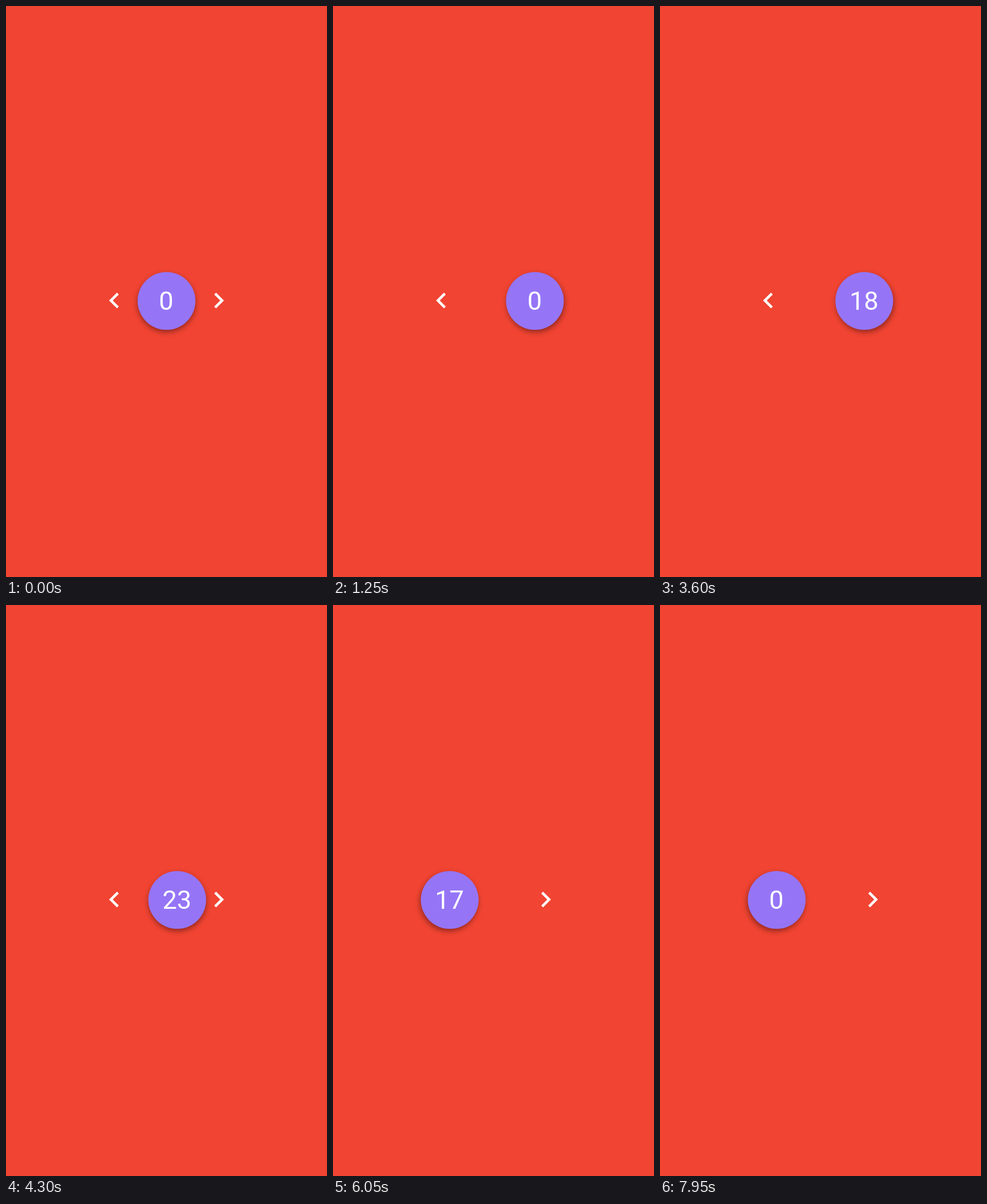
An HTML page with a canvas that plays this animation: 561x998 px, repeating every 8000 ms.

```html
<!DOCTYPE html>
<html lang="en">
<head>
<meta charset="utf-8">
<title>Stepper</title>
<style>
  html, body { margin: 0; width: 100%; height: 100%; overflow: hidden; background: #f14432; }
  canvas { display: block; }
</style>
</head>
<body>
<canvas id="stage" width="561" height="998"></canvas>
<script>
const ctx = document.getElementById('stage').getContext('2d');
const LOOP = 8000;
const MID = 280.5, Y = 515.5, RADIUS = 50.5;
const REACH = 76.5;
const TICK = 110, TOP = 23;
const RELEASE = 4090, DECAY = 150;

const clamp = (v, lo, hi) => Math.min(hi, Math.max(lo, v));

function smooth(t, from, to) {
  const u = clamp((t - from) / (to - from), 0, 1);
  return u * u * (3 - 2 * u);
}

// Drag right, let go, then drag left.
function knobX(t) {
  const right = t < RELEASE ? smooth(t, 830, 1320) : Math.exp((RELEASE - t) / DECAY);
  return MID + REACH * (right - smooth(t, 4870, 5230));
}

function ticks(t, start) {
  return clamp(Math.floor((t - start) / TICK) + 1, 0, TOP);
}

function drawChevron(side) {
  const s = 2.3;
  ctx.save();
  ctx.translate(MID + side * 100.4, 514.8);
  ctx.scale(side * s, s);
  ctx.fillStyle = '#fff';
  ctx.beginPath();
  ctx.moveTo(0, 0);
  ctx.lineTo(-6, -6);
  ctx.lineTo(-7.41, -4.59);
  ctx.lineTo(-2.83, 0);
  ctx.lineTo(-7.41, 4.59);
  ctx.lineTo(-6, 6);
  ctx.fill();
  ctx.restore();
}

function drawKnob(x, value) {
  ctx.save();
  ctx.shadowColor = 'rgba(0, 0, 0, 0.4)';
  ctx.shadowBlur = 10;
  ctx.shadowOffsetX = (x - MID) * 0.02;
  ctx.shadowOffsetY = 4;
  ctx.fillStyle = '#9575f6';
  ctx.beginPath();
  ctx.arc(x, Y, RADIUS, 0, Math.PI * 2);
  ctx.fill();
  ctx.restore();

  ctx.fillStyle = '#fff';
  ctx.font = '45px Roboto, sans-serif';
  ctx.textAlign = 'center';
  ctx.textBaseline = 'alphabetic';
  ctx.fillText(value, x - 0.5, 531);
}

function frame(now) {
  const t = now % LOOP;
  ctx.fillStyle = '#f14432';
  ctx.fillRect(0, 0, 561, 998);
  drawChevron(-1);
  drawChevron(1);
  drawKnob(knobX(t), ticks(t, 1645) - ticks(t, 5500));
  requestAnimationFrame(frame);
}
requestAnimationFrame(frame);
</script>
</body>
</html>
```
